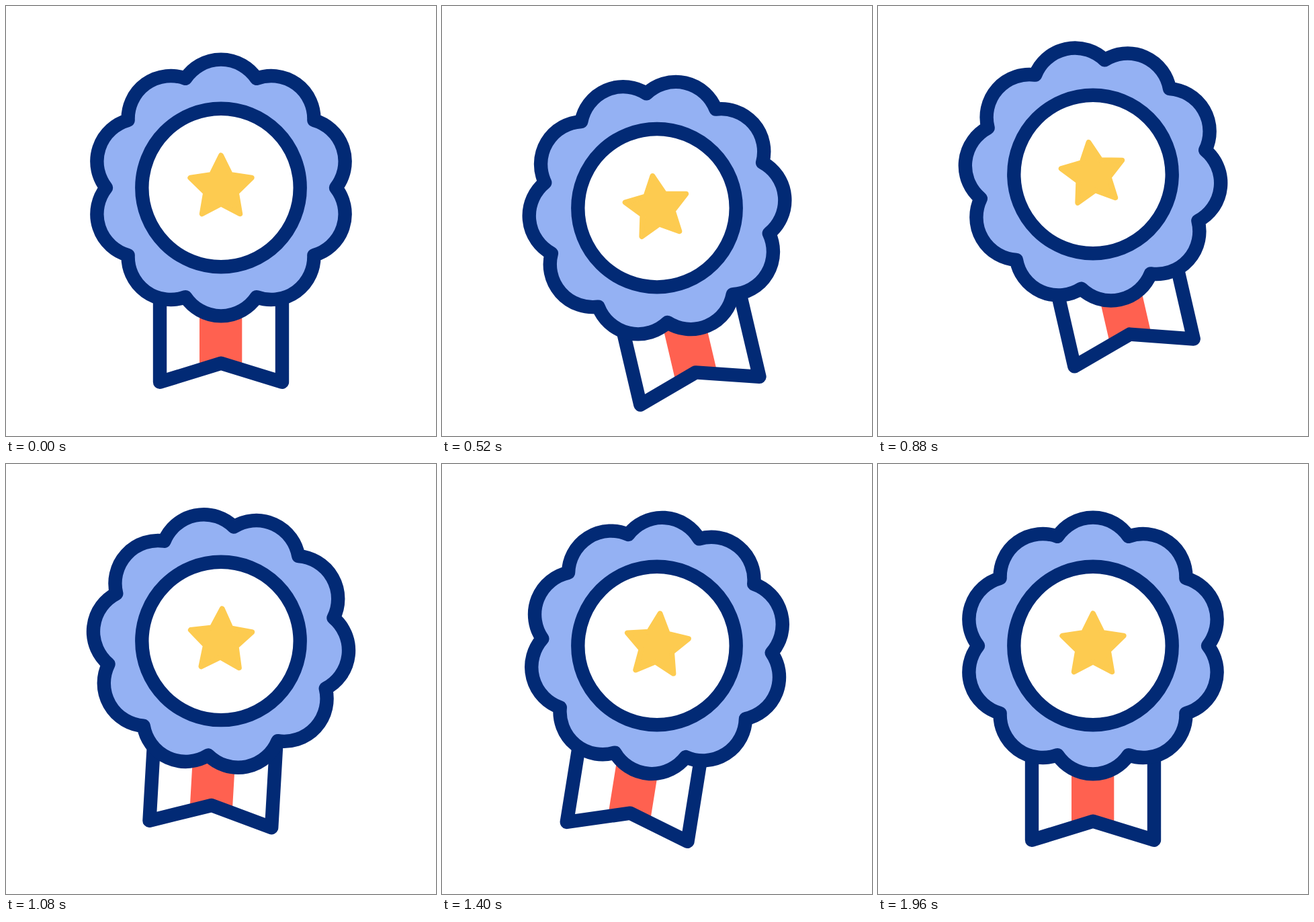
Animation, 640 px wide and 640 px high, one loop 2000 ms. Source, as an HTML page:

```html
<!DOCTYPE html>
<html lang="en">
<head>
<meta charset="utf-8">
<title>Award rosette</title>
<style>
  html, body { margin: 0; width: 100%; height: 100%; overflow: hidden; background: #fff; }
  svg { display: block; width: 100vw; height: 100vh; }
  .line { stroke: #022a75; stroke-width: 20.4; stroke-linejoin: round; stroke-linecap: round; }
</style>
</head>
<body>
<svg viewBox="-320 -270.5 640 640">
  <g id="badge">
    <g id="ribbon">
      <path fill="#ff6150" d="M-32 130V271L0 261.2L31.3 271V130Z"/>
      <path class="line" fill="none" d="M-91 130V289.3L0 261.2L91 289.3V130"/>
    </g>
    <path id="flower" class="line" fill="#94b1f3"/>
    <circle class="line" fill="#fff" r="117.7"/>
    <path id="star" fill="#fdcb50" stroke="#fdcb50" stroke-width="8" stroke-linejoin="round"/>
  </g>
</svg>
<script>
const LOOP = 2000;
const [badge, ribbon, flower, star] =
  ['badge', 'ribbon', 'flower', 'star'].map(id => document.getElementById(id));

// Point at a clockwise angle from straight up
const polar = (r, deg) => {
  const a = deg * Math.PI / 180;
  return `${(r * Math.sin(a)).toFixed(2)} ${(-r * Math.cos(a)).toFixed(2)}`;
};
const range = n => [...Array(n).keys()];

flower.setAttribute('d', `M${polar(171, -18)}` +
  range(10).map(i => `A63.6 63.6 0 0 1 ${polar(171, 18 + 36 * i)}`).join('') + 'Z');
star.setAttribute('d', 'M' + range(10).map(i => polar(i % 2 ? 24 : 48, 36 * i)).join('L') + 'Z');

// Keys are [time, value, slope]; a missing slope means the motion rests there
const lift = [[85, 0], [435, 35.3], [885, -20], [1210, 0]];
const swing = [[0, 0], [760, -17.3], [1240, 10.5], [1940, 0]];
const pull = [[0, 0], [950, -17.2], [1870, 0]];
const spin = [[100, 0], [320, 2.4, .045], [680, 27.6, .124], [1080, 96.4, .167],
  [1400, 147.5, .132], [1640, 170.2, .058], [1960, 180]];

function valueAt(keys, t) {
  const next = keys.findIndex(k => k[0] > t);
  if (next === 0) return keys[0][1];
  if (next < 0) return keys[keys.length - 1][1];
  const [t0, v0, m0 = 0] = keys[next - 1], [t1, v1, m1 = 0] = keys[next];
  const d = t1 - t0, u = (t - t0) / d, w = 1 - u;
  return v0 + (v1 - v0) * u * u * (3 - 2 * u) + d * u * w * (m0 * w - m1 * u);
}

function draw(now) {
  const t = now % LOOP, angle = valueAt(swing, t);
  badge.setAttribute('transform', `translate(0 ${valueAt(lift, t)})`);
  ribbon.setAttribute('transform', `rotate(${angle}) translate(0 ${valueAt(pull, t)})`);
  flower.setAttribute('transform', `rotate(${valueAt(spin, t)})`);
  star.setAttribute('transform', `rotate(${angle * .6})`);
}

let start;
function frame(now) {
  start ??= now;
  draw(now - start);
  requestAnimationFrame(frame);
}
draw(0);
requestAnimationFrame(frame);
</script>
</body>
</html>
```
